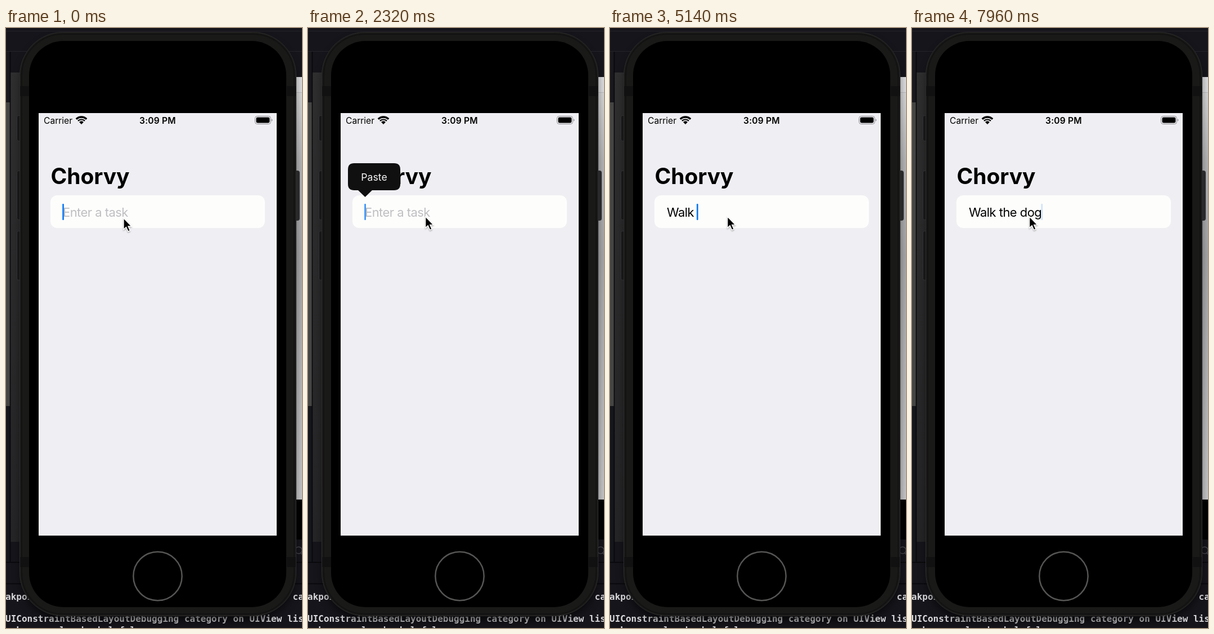
Recreate the animation shown at these times as an HTML page. Size 526x1065 px, loop 8 s.

```html
<!DOCTYPE html>
<html lang="en">
<head>
<meta charset="utf-8">
<title>Task list</title>
<style>
  html, body { margin: 0; width: 100%; height: 100%; overflow: hidden; background: #15141a; }
  svg { display: block; width: 526px; height: 1065px; }
  text { font-family: Inter, Roboto, sans-serif; white-space: pre; }
  .console text { font: bold 16px "DejaVu Sans Mono", "Noto Sans Mono", monospace; fill: #d9d9dc; }
  .status { font-size: 15.6px; }
  .input { font-size: 22px; letter-spacing: -.55px; }
  .title { font-size: 39px; font-weight: 700; letter-spacing: -.1px; }
</style>
</head>
<body>
<svg viewBox="0 0 526 1065">
  <defs>
    <linearGradient id="paper" x2="0" y2="1">
      <stop offset="0" stop-color="#dededf"/>
      <stop offset=".2" stop-color="#b5b5b7"/>
      <stop offset=".42" stop-color="#a7a7a9"/>
      <stop offset="1" stop-color="#c6c6c8"/>
    </linearGradient>
    <linearGradient id="side" x2="0" y2="1">
      <stop offset="0" stop-color="#302f30"/>
      <stop offset="1" stop-color="#252426"/>
    </linearGradient>
    <filter id="soft" x="-20%" y="-20%" width="140%" height="140%">
      <feGaussianBlur stdDeviation="9"/>
    </filter>
    <filter id="cursorShadow" x="-50%" y="-50%" width="200%" height="200%">
      <feDropShadow dx="0" dy="1.5" stdDeviation="1.2" flood-opacity=".35"/>
    </filter>
  </defs>

  <!-- Desktop behind the simulator -->
  <rect width="526" height="1065" fill="#16151b"/>
  <path d="M0 5.5H526M0 41.5H526" stroke="#26242c"/>
  <rect y="42" width="7" height="90" fill="#19181d"/>
  <rect y="132" width="7" height="539" fill="#454543"/>
  <rect y="671" width="7" height="277" fill="#15161b"/>
  <rect x="8" y="79" width="30" height="833" fill="url(#side)"/>
  <path d="M7.5 42V948M0 948.5H526M0 986.5H526" stroke="#07070a" stroke-width="1.5"/>
  <rect x="490" y="87" width="36" height="750" fill="url(#paper)"/>
  <rect x="490" y="87" width="36" height="27" fill="#dcdcde"/>
  <path d="M490 114.5H526" stroke="#bdbdbf"/>
  <rect x="490" y="837" width="36" height="71" fill="#020203"/>
  <g fill="none" stroke="#45454b" stroke-width="1.4">
    <circle cx="520" cy="927" r="6"/><path d="M524 932L528 936"/>
  </g>
  <g class="console">
    <text x="-1" y="1015">akpoint at UIViewAlertForUnsatisfiableConstraints to catch</text>
    <text x="-1" y="1054">UIConstraintBasedLayoutDebugging category on UIView listed</text>
    <text x="-1" y="1073.5">w.h&gt; may also be helpful.</text>
  </g>

  <!-- Phone -->
  <rect x="29" y="20" width="482" height="1030" rx="76" fill="#000" opacity=".75" filter="url(#soft)"/>
  <g fill="#171718" stroke="#303033">
    <rect x="19.5" y="155.5" width="9" height="45" rx="3"/>
    <rect x="19.5" y="253.5" width="9" height="87" rx="3"/>
    <rect x="19.5" y="360.5" width="9" height="87" rx="3"/>
    <rect x="511.5" y="253.5" width="10" height="88" rx="3" fill="#29292b"/>
  </g>
  <rect x="24.5" y="7.5" width="491" height="1036" rx="77" fill="#191918" stroke="#2d2c2b"/>
  <rect x="28" y="11" width="484" height="1029" rx="73" fill="none" stroke="#121212" stroke-width="2"/>
  <path d="M25 103H41V121H25zM499 103H515V121H499zM25 939H41V957H25zM499 939H515V957H499z" fill="#111112"/>
  <rect x="41" y="23" width="457" height="1005" rx="61"/>
  <circle cx="269.5" cy="973" r="43.2" fill="none" stroke="#555554" stroke-width="2.5"/>

  <!-- App -->
  <rect x="58" y="151" width="423" height="750" fill="#efeff3"/>
  <text class="status" x="67" y="170">Carrier</text>
  <path d="M134 171L123.6 160.6A14.7 14.7 0 0 1 144.4 160.6Z"/>
  <g fill="none" stroke="#efeff3" stroke-width="1.8">
    <path d="M126 164.2A10.8 10.8 0 0 1 142 164.2M129 167A6 6 0 0 1 139 167"/>
  </g>
  <text class="status" x="269.5" y="170" text-anchor="middle" font-weight="600" letter-spacing=".2">3:09 PM</text>
  <rect x="442.5" y="156.5" width="28" height="14" rx="4" fill="none" stroke="#8c8c90"/>
  <rect x="444.5" y="158.5" width="24" height="10" rx="2.4"/>
  <path d="M472 161.3Q475 163.5 472 165.7Z" fill="#8c8c90"/>
  <text class="title" x="79.5" y="277">Chorvy</text>
  <rect x="79" y="297" width="381" height="58" rx="12" fill="#fdfdfc"/>
  <text class="input" id="hint" x="101" y="334.5" fill="#bfbfc2">Enter a task</text>
  <text class="input" id="typed" x="101" y="334.5"></text>
  <rect id="caret" y="312" width="2.7" height="29" rx="1.2" fill="#0a78f5"/>
  <g id="menu">
    <path d="M82 240H153Q164 240 164 251V277Q164 288 153 288H114L101.5 300L89 288H82Q71 288 71 277V251Q71 240 82 240Z" fill="#101011"/>
    <text x="117.5" y="271" text-anchor="middle" font-size="17.7" fill="#f4f4f4">Paste</text>
  </g>
  <path id="cursor" d="M0 0V20L4.5 15.8L8 23.6L11.4 22.1L8 14.5H14Z" stroke="#fff" stroke-width="1.3" filter="url(#cursorShadow)"/>
</svg>
<script>
  const LOOP = 8000;
  const PHRASE = "Walk the dog";
  const KEY_TIMES = [3240, 4200, 4480, 4740, 5020, 5340, 5580, 5820, 6080, 6640, 7000, 7340];
  const MENU_TAP = 1400;
  const part = id => document.getElementById(id);
  const [hint, typed, caret, menu, cursor] = ["hint", "typed", "caret", "menu", "cursor"].map(part);

  const clamp = v => Math.min(1, Math.max(0, v));
  const ramp = (t, start, length) => clamp((t - start) / length);
  const ease = v => v * v * (3 - 2 * v);

  // The caret blinks once a second, counted from the last tap or key.
  function blink(elapsed) {
    const p = elapsed % 1000;
    return 1 - ramp(p, 500, 150) + ramp(p, 800, 150);
  }

  function render(t) {
    const count = KEY_TIMES.filter(k => k <= t).length;
    const lastAction = count ? KEY_TIMES[count - 1] : t >= MENU_TAP ? MENU_TAP : 0;
    typed.textContent = PHRASE.slice(0, count);
    hint.style.display = count ? "none" : "";
    caret.setAttribute("x", 100.2 + (count ? typed.getComputedTextLength() : 0));
    caret.setAttribute("opacity", blink(t - lastAction));
    menu.setAttribute("opacity", ramp(t, 1480, 250) * (1 - ramp(t, 3310, 250)));
    const settle = 1 - ease(ramp(t, 0, 300));
    cursor.setAttribute("transform", `translate(${208.7 + .3 * settle} ${334.8 + 2.7 * settle})`);
  }

  const start = performance.now();
  function tick() {
    render((performance.now() - start) % LOOP);
    requestAnimationFrame(tick);
  }
  render(0);
  requestAnimationFrame(tick);
</script>
</body>
</html>
```
